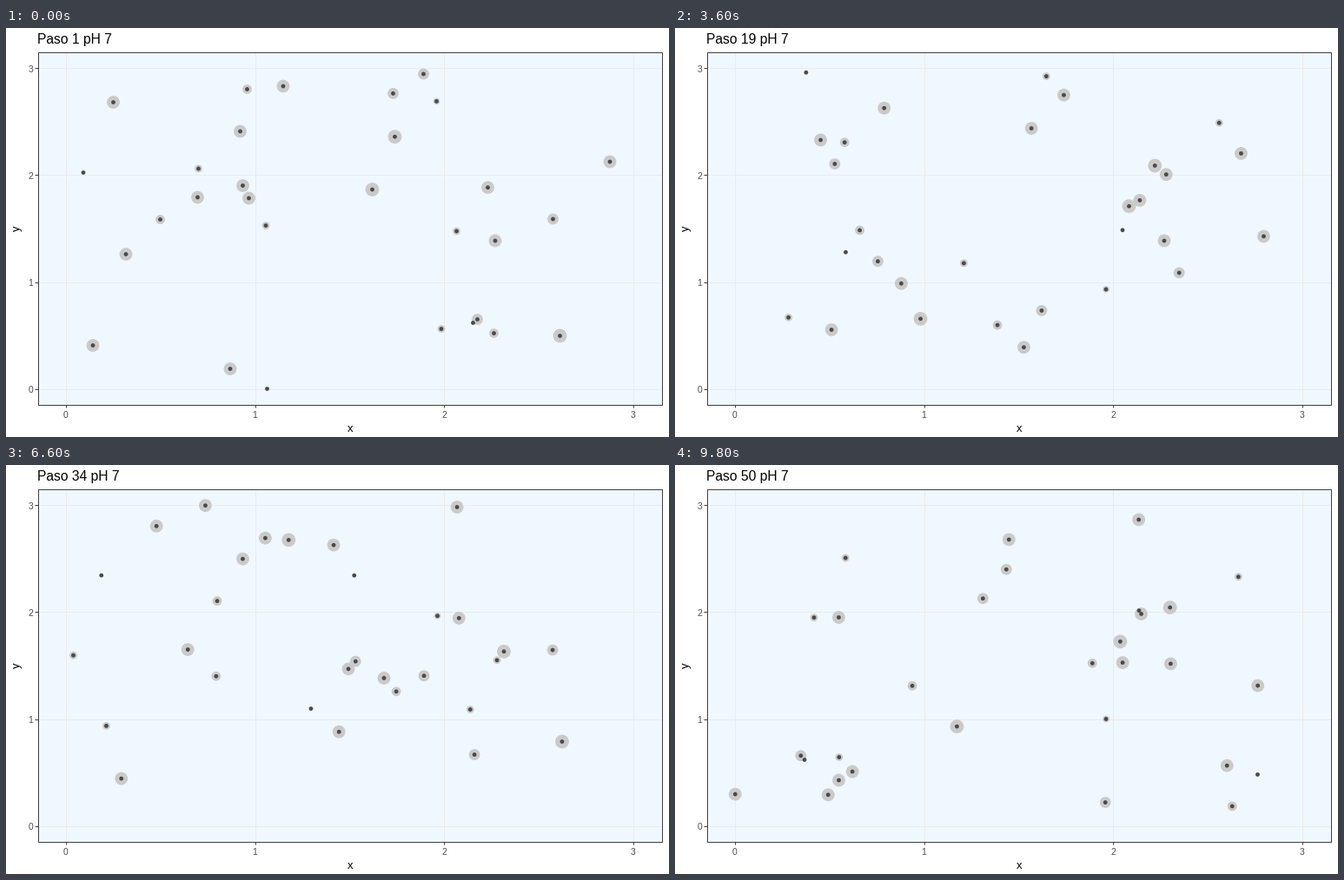
Write a matplotlib script that moves like this. It is 763 px wide and 471 px high and loops after 10000 ms.

```python
import numpy as np
import matplotlib.pyplot as plt
from matplotlib.animation import FuncAnimation
from matplotlib.patches import Rectangle

W, H, DPI = 763, 471, 64
PT = 72 / DPI  # points per pixel
STEPS = 50

# Particles live on a torus of 3 by 3 data units, placed here in pixels
CORNER = np.array([69.3, 46.9])
SPAN = np.array([653.2, 369.2])
UNIT = SPAN / 3
REACH = 0.05  # meeting distance in data units

# Halo radius -> particles (x, y, step in x, step in y).
# When two meet, the one listed first turns back.
GROUPS = {
    5.4: [(278, 71, 5.2, -5.42), (178, 221, 1.95, 0.69),
          (562, 352, 15.94, 8.3)],
    7.9: [(422, 186.5, 10.1, 1.92), (448, 125.7, 17.46, 5.55),
          (638, 355, -19.72, -1.09)],
    0: [(538, 340, 16.66, 5.06), (89.5, 167, -12.62, 3.68),
        (301, 416, -5.78, -8.74)],
    3.8: [(496, 84.9, 0.03, -8.48)],
    7.4: [(319.5, 67.5, 6.87, -5.71), (221, 195.5, 19.62, -4.49),
          (563.5, 245.5, -21.31, -11.39), (555, 184.2, -20.8, -11.41),
          (124, 86, -18.29, -0.46), (270, 119.5, 7.2, 6.69),
          (273, 182, -21.71, 0.94), (280, 196.5, 7.26, -4.47),
          (138.5, 261, -12.55, -5.1), (695.5, 154.5, 6.99, -1.39),
          (100.5, 366, 8.91, -3.96), (258.5, 393, -14.43, 6.73)],
    4.4: [(222, 162.5, -5.05, -10.99), (519, 234.5, -15.51, 3.07),
          (299.5, 228, 7.13, -9.55), (501.5, 347, 6.96, 7.33)],
    6.4: [(543, 336, -17.17, -3.71), (481, 53.5, 19.81, 5.75),
          (446, 75.9, -1.31, -6.62), (630, 220.5, -2.74, 3.44)],
}


def simulate():
    state = np.array([p for group in GROUPS.values() for p in group])
    pos, vel = state[:, :2], state[:, 2:]
    path = []
    for _ in range(STEPS):
        path.append(pos)
        gap = (pos[:, None] - pos[None]) / UNIT
        near = np.hypot(gap[..., 0], gap[..., 1]) < REACH
        vel[np.triu(near, 1).any(axis=1)] *= -1
        pos = CORNER + (pos + vel - CORNER) % SPAN
    return path


def area(radius):
    return (2 * radius * PT) ** 2


plt.rcParams["font.family"] = "Liberation Sans"
path = simulate()
radii = np.repeat(list(GROUPS), [len(g) for g in GROUPS.values()])

fig = plt.figure(figsize=(W / DPI, H / DPI), dpi=DPI, facecolor="white")
ax = fig.add_axes([0, 0, 1, 1])
ax.set_xlim(0.5, W + 0.5)
ax.set_ylim(H + 0.5, 0.5)
ax.axis("off")

X0, X1, Y0, Y1 = 37, 755, 28, 434


def line(xs, ys, color, z):
    ax.plot(xs, ys, color=color, lw=PT, zorder=z, solid_capstyle="butt")


def label(x, y, text, size, color="black", va="baseline", **kw):
    return ax.text(x, y, text, fontsize=size * PT, color=color, va=va, **kw)


def panel(z, **kw):
    ax.add_patch(Rectangle((X0, Y0), X1 - X0, Y1 - Y0, zorder=z, **kw))


panel(0, fc="#f0f8ff", ec="none")
panel(4, fc="none", ec="#404040", lw=PT)
for n in range(4):
    gx = CORNER[0] + n * UNIT[0]
    gy = CORNER[1] + (3 - n) * UNIT[1]
    line([gx, gx], [Y0, Y1], "#ebebeb", 1)
    line([X0, X1], [gy, gy], "#ebebeb", 1)
    line([gx, gx], [Y1, Y1 + 3.5], "#404040", 4)
    line([X0 - 3.5, X0], [gy, gy], "#404040", 4)
    label(gx, 449, n, 10.4, "#4d4d4d", ha="center")
    label(31.5, gy + 4.5, n, 10.4, "#4d4d4d", ha="right")

label(396.5, 465, "x", 13, ha="center")
label(13.5, 231.5, "y", 13, ha="center", va="center", rotation=90)
title = label(37, 18.5, "", 15.6)

halos = ax.scatter(*path[0].T, s=area(radii), c="#cacaca",
                   linewidths=0, zorder=2)
dots = ax.scatter(*path[0].T, s=area(np.full(len(radii), 2.4)), c="#4a4a4a",
                  linewidths=0, zorder=3)


def draw(k):
    halos.set_offsets(path[k])
    dots.set_offsets(path[k])
    title.set_text(f"Paso {k + 1} pH 7")
    return halos, dots, title


anim = FuncAnimation(fig, draw, frames=STEPS, interval=200, repeat=True,
                     repeat_delay=0)
plt.show()
```
